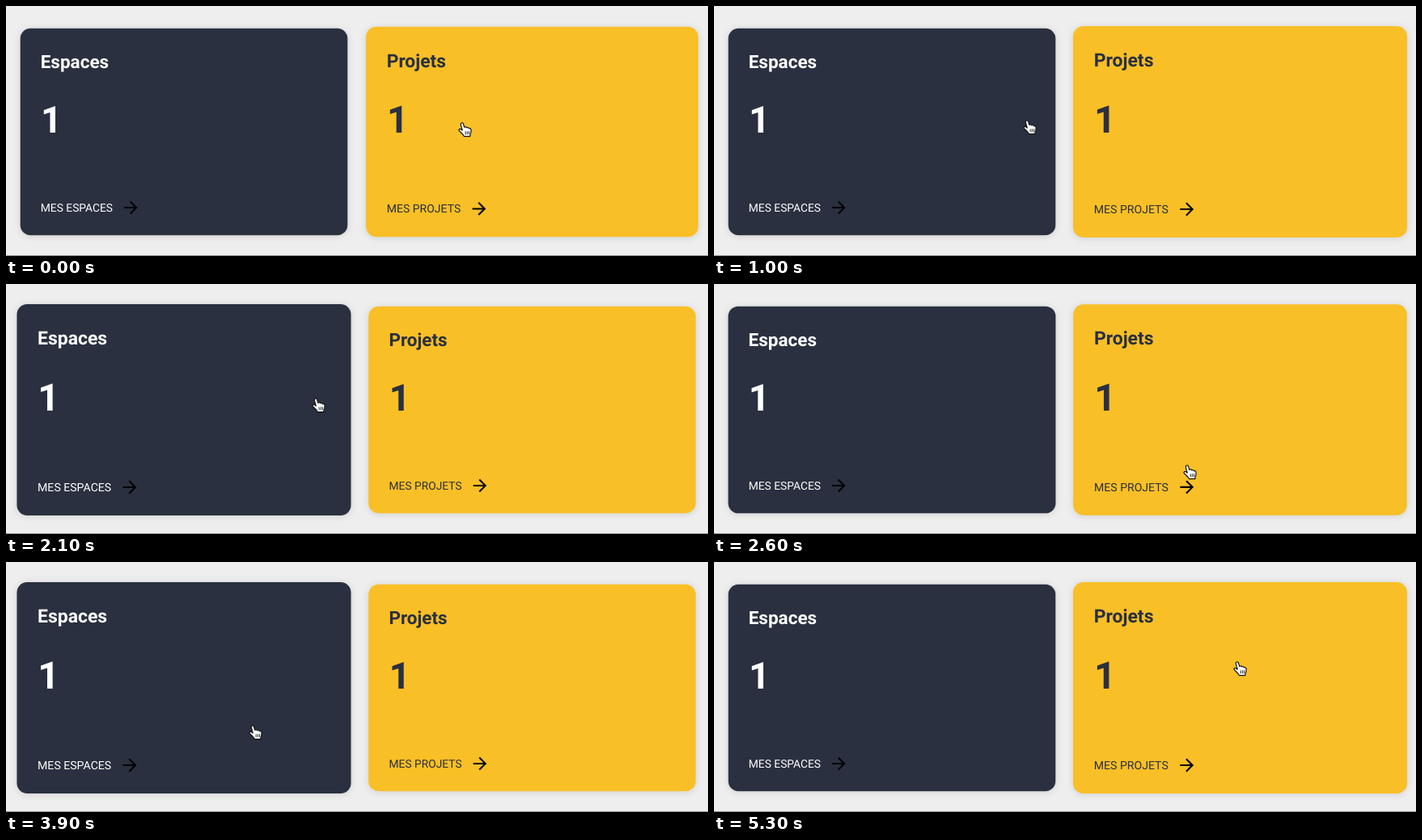
Write an HTML page that moves like this. It is 868 px wide and 310 px high and loops after 6.2 s.

```html
<!DOCTYPE html>
<html lang="fr">
<head>
<meta charset="utf-8">
<title>Espaces et projets</title>
<style>
  html, body { margin: 0; width: 100%; height: 100%; overflow: hidden; background: #eeeeef; }
  svg { display: block; width: 868px; height: 310px; }
  text { font-family: Roboto, Arial, sans-serif; text-rendering: geometricPrecision; }
  .title { font-size: 22.5px; font-weight: 700; }
  .count { font-size: 46px; font-weight: 700; }
  .link { font-size: 13.8px; }

  .card { filter: drop-shadow(0 1px 4px rgba(0, 0, 0, .13)); }
  .spaces { --bg: #2a303f; --ink: #fff; transform-origin: 220px 156px; animation-name: spaces; }
  .projects { --bg: #f9bf27; --ink: #2a303f; transform-origin: 650.5px 156px; animation-name: projects; }
  .card rect { fill: var(--bg); }
  .card text, .card path { fill: var(--ink); }

  /* Paused animations are placed on the timeline by --t */
  .card, .hand {
    transform-box: view-box;
    animation-duration: 6200ms;
    animation-iteration-count: infinite;
    animation-timing-function: ease;
    animation-play-state: paused;
    animation-delay: calc(var(--t, 0) * -1ms);
  }
  .hand { animation-name: hand; }

  @keyframes spaces {
    0%, 18.23% { transform: scale(1); }
    23.06%, 38.23% { transform: scale(1.021); }
    43.06%, 57.42% { transform: scale(1); }
    62.26%, 79.52% { transform: scale(1.021); }
    84.35%, 100% { transform: scale(1); }
  }
  @keyframes projects {
    0% { transform: scale(1.0155); animation-timing-function: ease-out; }
    2.58%, 18.23% { transform: scale(1.021); }
    23.06%, 38.55% { transform: scale(1); }
    43.39%, 57.42% { transform: scale(1.021); }
    62.26%, 80.16% { transform: scale(1); }
    85%, 100% { transform: scale(1.021); }
  }
  @keyframes hand {
    0% { transform: translate(567px, 153px); animation-timing-function: ease-out; }
    3.23%, 9.68% { transform: translate(594px, 156px); animation-timing-function: cubic-bezier(.5, 0, .7, .9); }
    16.13% { transform: translate(390px, 150px); animation-timing-function: ease-out; }
    20.97%, 29.03% { transform: translate(362px, 149px); animation-timing-function: ease-in; }
    33.87% { transform: translate(386px, 150px); animation-timing-function: cubic-bezier(.4, .2, .7, .8); }
    38.71% { transform: translate(563px, 215px); animation-timing-function: ease-out; }
    41.94% { transform: translate(588px, 233px); animation-timing-function: ease-out; }
    45.16%, 50% { transform: translate(596px, 236px); animation-timing-function: cubic-bezier(.5, 0, .7, .9); }
    56.45% { transform: translate(353px, 210px); animation-timing-function: ease-out; }
    62.9%, 75.81% { transform: translate(308px, 211px); animation-timing-function: cubic-bezier(.4, 0, .3, 1); }
    85.48%, 100% { transform: translate(650px, 132px); }
  }
</style>
</head>
<body>
<svg viewBox="0 0 868 310">
  <defs>
    <path id="arrow" d="M0-8l-1.41 1.41L4.17-1H-8v2H4.17L-1.41 6.59 0 8l8-8z"/>
  </defs>
  <rect width="868" height="310" fill="#eeeeef"/>
  <rect y="309" width="868" height="1" fill="#929293"/>

  <g class="card spaces">
    <rect x="17.7" y="27.8" width="404.6" height="256.4" rx="12.5"/>
    <text class="title" x="42.7" y="77">Espaces</text>
    <text class="count" x="43" y="157">1</text>
    <text class="link" x="42.8" y="254.8">MES ESPACES</text>
    <use href="#arrow" transform="translate(154.4 250) scale(1.03)"/>
  </g>

  <g class="card projects">
    <rect x="448.2" y="27.8" width="404.6" height="256.4" rx="12.5"/>
    <text class="title" x="473.4" y="77">Projets</text>
    <text class="count" x="473.7" y="157">1</text>
    <text class="link" x="473.5" y="254.8">MES PROJETS</text>
    <use href="#arrow" transform="translate(586 250) scale(1.03)"/>
  </g>

  <g class="hand" stroke="#111" stroke-linecap="round" stroke-linejoin="round">
    <path fill="#fff" stroke-width="1.2" d="M-2.8 1.2L-4.6-5.6C-5.2-8.2-2.2-9-1.4-6.6L-.3-2.6C.8-3.6 2.3-3.2 2.7-2.1C3.8-2.8 5.2-2.2 5.5-1.2C6.9-1.7 8-.8 8 .6C8.1 3 7.8 5 7 6.4L6.8 8.6H-.6C-1.4 6.4-4.8 3.8-6.6 1.6C-7.6.2-6-1.2-4.6-.2Z"/>
    <path fill="none" stroke-width=".9" d="M1.2 2.8v3.2M3.4 2.7v3.2M5.5 2.7v3"/>
  </g>
</svg>
<script>
  const LOOP = 6200, STEP = 100;
  const start = performance.now();

  function draw() {
    const t = (performance.now() - start) % LOOP;
    document.documentElement.style.setProperty('--t', Math.floor(t / STEP) * STEP);
    requestAnimationFrame(draw);
  }
  draw();
</script>
</body>
</html>
```
